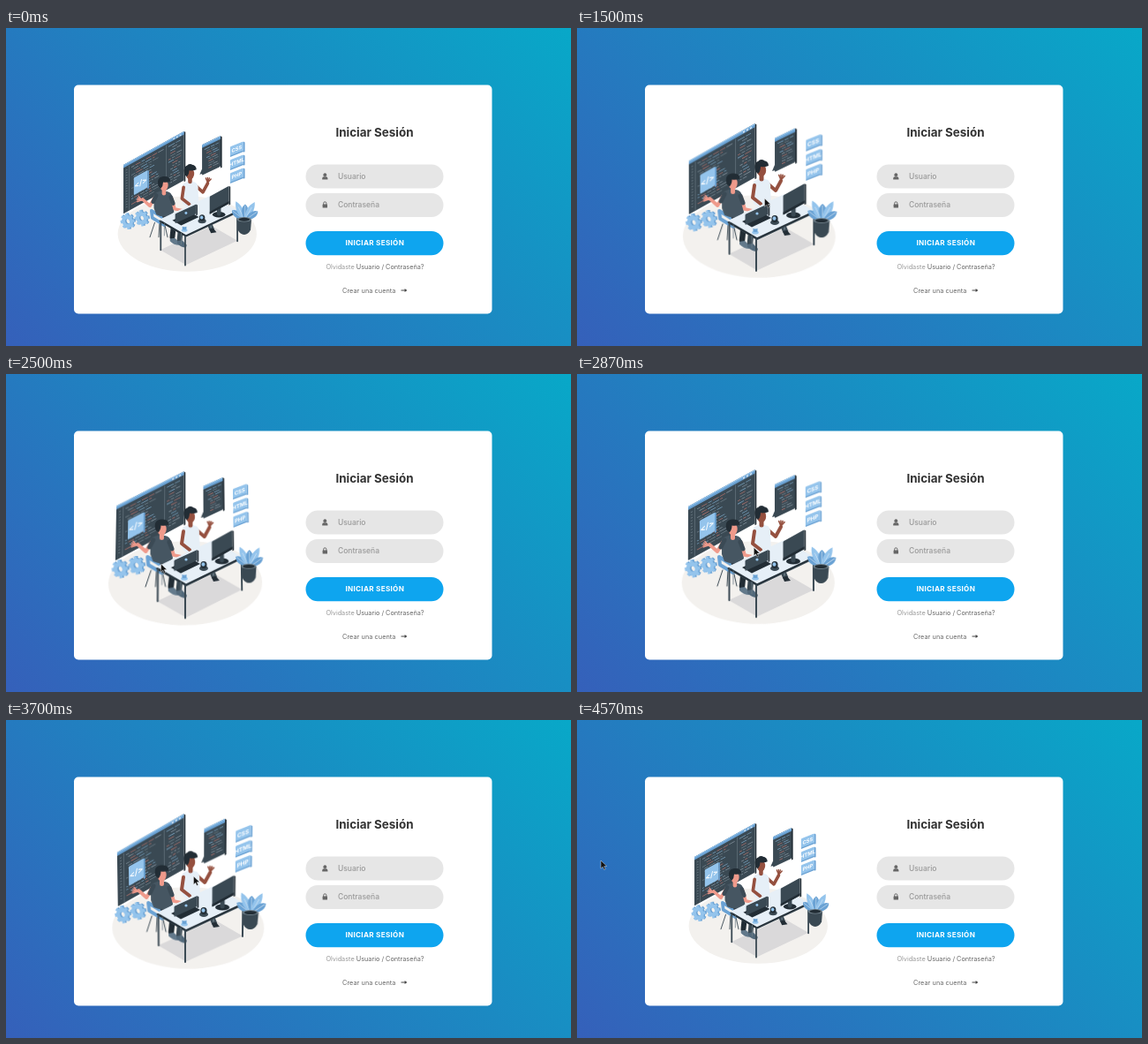
These frames come from a looping animation (640x360 px, 4600 ms). An HTML page:

```html
<!DOCTYPE html>
<html lang="es">
<head>
<meta charset="utf-8">
<title>Iniciar Sesión</title>
<style>
  html, body { margin: 0; width: 100%; height: 100%; overflow: hidden; }
  body { position: relative; background: linear-gradient(45deg, #3560ba, #08a8c8); }
  svg { position: absolute; left: 0; top: 0; width: 640px; height: 360px; }
  #art { transform-origin: 203px 204px; }
  text { font-family: Inter, "Open Sans", sans-serif; }
  .mid { text-anchor: middle; }
  .field { font-size: 8.5px; font-weight: 500; fill: #999; }
  .link { font-size: 7.3px; fill: #666; }
</style>
</head>
<body>
<svg viewBox="0 0 640 360">
  <rect x="77" y="64.5" width="473.5" height="259" rx="5" fill="#fff"/>
  <text class="mid" x="417.5" y="122.5" font-size="13.4" font-weight="700" fill="#333">Iniciar Sesión</text>
  <g fill="#e6e6e6">
    <rect x="339.5" y="154.5" width="156" height="27" rx="13.5"/>
    <rect x="339.5" y="187" width="156" height="27" rx="13.5"/>
  </g>
  <g fill="#666">
    <circle cx="361.3" cy="166.2" r="1.9"/>
    <path d="M358.2 171.5v-1q0-2.3 2-2.3h2.2q2 0 2 2.3v1z"/>
    <rect x="358.6" y="199.6" width="5.4" height="4" rx=".6"/>
    <path d="M359.7 200v-1.6a1.6 1.6 0 0 1 3.2 0v1.6" fill="none" stroke="#666"/>
  </g>
  <text class="field" x="376" y="171">Usuario</text>
  <text class="field" x="376" y="203.3">Contraseña</text>
  <rect x="339.5" y="230" width="156" height="27.3" rx="13.6" fill="#0ea5ef"/>
  <text class="mid" x="417.8" y="246.4" font-size="8.1" font-weight="700" letter-spacing=".3" fill="#fff">INICIAR SESIÓN</text>
  <text class="link mid" x="418" y="272.5"><tspan fill="#999">Olvidaste</tspan> Usuario / Contraseña?</text>
  <text class="link" x="381" y="299.7" letter-spacing=".06">Crear una cuenta</text>
  <path d="M447.5 297h5" stroke="#444"/><path d="M451.6 295l2.8 2-2.8 2z" fill="#444"/>
</svg>
<svg id="art" viewBox="0 0 640 360"></svg>
<svg viewBox="0 0 640 360">
  <path id="cursor" d="M0 0v9.2l2.2-2 1.5 3.3 1.5-.7-1.4-3.2h3z" fill="#111" stroke="#fff" stroke-width=".4"/>
</svg>
<script>
const DARK = '#3a4953', INK = '#222d35', GREY = '#6f7f89', BLUE = '#94c4ec', DEEP = '#6aa2d4',
      PALE = '#e6eff7', PINK = '#ef9a8b', BROWN = '#95503f';

let seed = 7;
const rnd = () => (seed = seed * 16807 % 2147483647) / 2147483647;
const repeat = (n, draw) => Array.from({ length: n }, (_, i) => draw(i)).join('');

const shape = (d, fill) => `<path d="${d}" fill="${fill}"/>`;
const line = (d, color, width) =>
  `<path d="${d}" fill="none" stroke="${color}" stroke-width="${width}" stroke-linecap="round" stroke-linejoin="round"/>`;
const oval = (x, y, rx, ry, fill) => `<ellipse cx="${x}" cy="${y}" rx="${rx}" ry="${ry}" fill="${fill}"/>`;
const rect = (x, y, w, h, fill, rx = 0) =>
  `<rect x="${x}" y="${y}" width="${w}" height="${h}" rx="${rx}" fill="${fill}"/>`;
const place = (x, y, content, more = '') => `<g transform="translate(${x} ${y}) ${more}">${content}</g>`;
const label = (x, y, size, str) =>
  `<text class="mid" x="${x}" y="${y}" font-size="${size}" font-weight="700" fill="#fff">${str}</text>`;

// Isometric surfaces: a floor parallelogram and an upright panel rising to the right
const floor = (x, y, along, across, fill) =>
  shape(`M${x} ${y}l${along} ${-.47 * along} ${across} ${.58 * across} ${-along} ${.47 * along}z`, fill);
const panel = (x, y, w, h, slope, fill, edge, content = '') =>
  `<g transform="matrix(1 ${-slope} 0 1 ${x} ${y})">` +
  shape(`M${w} 0l1.8 2v${h}h-1.8z`, edge) + rect(0, 0, w, h, fill, 1) + content + '</g>';

const code = (x, y, width, rows, step) => repeat(rows, i => {
  let out = '', pos = x + Math.floor(rnd() * 3) * 2.5;
  const end = x + width * (.45 + rnd() * .4);
  while (pos < end) {
    const w = Math.min(2 + rnd() * 6, x + width - pos);
    out += rect(pos, y + i * step, w, .8, ['#8795a0', GREY, '#b3736d', '#7ba4c2'][Math.floor(rnd() * 4)]);
    pos += w + 1.3;
  }
  return out;
});

const titleBar = w => rect(0, 0, w, 4, DEEP) + rect(0, 0, w, 1.2, BLUE);

const board = () =>
  panel(126, 150, 75.5, 61, .553, DARK, INK,
    titleBar(75.5) + repeat(3, i => rect(62 + 4 * i, 1.6, 2, 1.5, PALE)) +
    rect(7, 5, .6, 55, GREY) + rect(53, 5, .6, 55, GREY) +
    repeat(15, i => rect(3, 8 + i * 3.3, 2, .8, GREY)) +
    code(10, 8, 41, 15, 3.3) + code(56, 8, 18, 15, 3.3)) +
  panel(139, 166, 17, 21.5, .553, BLUE, DEEP, label(8.5, 14, 9, '&lt;/&gt;'));

const bubble = () =>
  shape('M224 155l-3 7 8-2z', DARK) +
  panel(224, 125, 23, 38, .48, DARK, INK, titleBar(23) + code(3, 7, 18, 10, 2.8));

const tag = (str, i) =>
  panel(259, 127.5 + i * 16.5, 16.5, 11.5, .4, BLUE, DEEP, rect(0, 11, 16.5, 1.6, DEEP) + label(8.2, 8.2, 6.4, str));

const gear = (x, y) => place(x, y,
  [[2, DEEP], [0, BLUE]].map(([dx, color]) => place(dx, 0,
    `<circle r="5.6" fill="none" stroke="${color}" stroke-width="5"/>` +
    `<circle r="8.6" fill="none" stroke="${color}" stroke-width="3.2" stroke-dasharray="3.6 3.16"/>`)).join(''),
  'rotate(-20) scale(.84 1)');

const head = (x, y, skin) => place(x, y,
  line('M0 4v6', skin, 5) + oval(0, 0, 5.2, 7, skin) +
  shape('M-7 1q-3-11 6-12 9-1 9 6-5 2-9 1 0 5-3 8z', INK));

// Open hand: a fan of fingers around the given angle
const hand = (x, y, angle, skin) => place(x, y,
  repeat(4, i => `<g transform="rotate(${i * 22 - 33})">${line('M0 0h6', skin, 1.6)}</g>`), `rotate(${angle})`);

const leg = (x, y, cloth, shoe) =>
  line(`M${x} ${y}l11 7-2 19`, cloth, 6.5) +
  place(x + 6, y + 28, shape('M0 0l6-1 6 6-1 3q-6 0-11-5z', shoe));

const woman = () =>
  line('M213 203l15 8 8 19', DARK, 6) + place(233, 230, shape('M0 0l5-1 4 5-7 1z', INK)) +
  line('M217 177l8 7 6-11', BROWN, 4) + hand(231, 172, -80, BROWN) +
  shape('M200 174q7-6 16-2 4 3 3 10l1 18q-10 7-20-1l-2-14z', PALE) +
  line('M201 178l-2 14 9 7', BROWN, 4) +
  oval(209, 152, 3.5, 3, INK) + head(209, 161, BROWN);

const man = () =>
  repeat(3, i => line(`M${165 + 6 * i} 222l${5 * i - 6} 18`, DARK, 1)) +
  line('M161 207l16 10v8l-15-9z', DEEP, 4) +
  leg(178, 214, INK, '#62798b') + leg(187, 217, DARK, '#52697b') +
  line('M166 189l-7 12-9-8', PINK, 4) + hand(149, 194, 195, PINK) +
  shape('M164 187q6-6 16-4 6 1 7 7l2 19q-9 9-22 3l-3-8z', '#465662') +
  line('M167 188l-4 8', '#3b4a55', 5) +
  line('M186 191l4 14 10 2', PINK, 3.8) + line('M185 190l3 8', '#3b4a55', 5) +
  head(176.5, 175.5, PINK);

const desk = () =>
  line('M235 190v38', GREY, 1.5) +
  floor(171, 221, 64, 33, DARK) + line('M171.5 220l32 18 64-30', INK, 2) + floor(171, 218, 64, 33, PALE) +
  repeat(3, i => line(`M${[172.5, 203, 268][i]} ${[220, 239, 209][i]}v36`, DARK, 2)) +
  line('M177 223v15M198 235v14', GREY, .8) +
  floor(187, 219, 22, 11, INK) + panel(190.5, 211, 26, 12, .46, DARK, INK) + oval(204, 210, 1.6, 1.6, BLUE) +
  oval(245, 212, 8, 3.6, INK) + line('M245 200v11', DARK, 5) +
  panel(233.5, 189.5, 24, 22, .55, DARK, INK, rect(0, 19, 24, 3, INK)) +
  oval(224, 220, 5, 3, DARK) + oval(224, 216, 3.6, 4, INK) + oval(223.5, 215.5, 2, 2.2, BLUE) +
  oval(202, 231.5, 3.8, 2, BLUE) + rect(199.5, 226, 5, 5, DEEP, 1.5) + oval(202, 226.3, 2.5, 1.2, PALE);

const plant = () =>
  repeat(5, i => place(277, 219,
    shape(`M0 0q-8-14 0-${i % 2 ? 26 : 20} 8 ${i % 2 ? 12 : 6} 0 ${i % 2 ? 26 : 20}z`, i % 2 ? BLUE : DEEP) +
    line('M0 0v-18', PALE, .5), `rotate(${i * 27 - 52})`)) +
  shape('M267.5 218l1 13q3 6 8 6t8-6l1-13z', DARK) +
  oval(276.5, 218, 9, 3, GREY) + oval(276.5, 218, 7, 2.1, INK);

const art = document.getElementById('art'), cursor = document.getElementById('cursor');
art.innerHTML = oval(205.5, 236, 86.5, 46.8, '#f3f1ee') + floor(172, 256, 64, 32, '#dad9da') +
  board() + bubble() + ['CSS', 'HTML', 'PHP'].map(tag).join('') + gear(148.5, 216.5) + gear(131, 220.5) +
  woman() + man() + desk() + plant();

const LOOP = 4600;
// Pointer stops: time, x, y
const stops = [
  [0, -20, 190], [270, -20, 190], [700, 205, 195], [1115, 38, 181], [1500, 212.5, 193],
  [2500, 175.5, 215], [3240, 225, 178], [3700, 212.5, 177], [4200, 27, 159], [LOOP, 27, 159]
];
const hovers = [[500, 1000], [1300, 3950]];
const clamp = (v, lo, hi) => Math.min(hi, Math.max(lo, v));
const settle = ms => 1 - (1 - clamp(ms / 300, 0, 1)) ** 4;

function pointer(t) {
  const i = stops.findIndex(stop => stop[0] > t);
  const [t0, x0, y0] = stops[i - 1], [t1, x1, y1] = stops[i];
  const k = (t - t0) / (t1 - t0), eased = k * k * (3 - 2 * k);
  return [x0 + (x1 - x0) * eased, y0 + (y1 - y0) * eased];
}

function frame(now) {
  const t = now % LOOP;
  const [x, y] = pointer(t);
  const lift = hovers.reduce((sum, [on, off]) => sum + settle(t - on) - settle(t - off), 0);
  const scale = (1 + .1 * lift) / 1.1;
  // The side under the pointer comes nearer
  const tilt = offset => -.00102 * lift * scale * clamp(offset / 86, -1, 1);
  art.style.transform =
    `matrix3d(${scale},0,0,${tilt(x - 203)},0,${scale},0,${tilt(y - 194)},0,0,1,0,0,0,0,1)`;
  cursor.setAttribute('transform', `translate(${x} ${y})`);
  requestAnimationFrame(frame);
}
requestAnimationFrame(frame);
</script>
</body>
</html>
```
